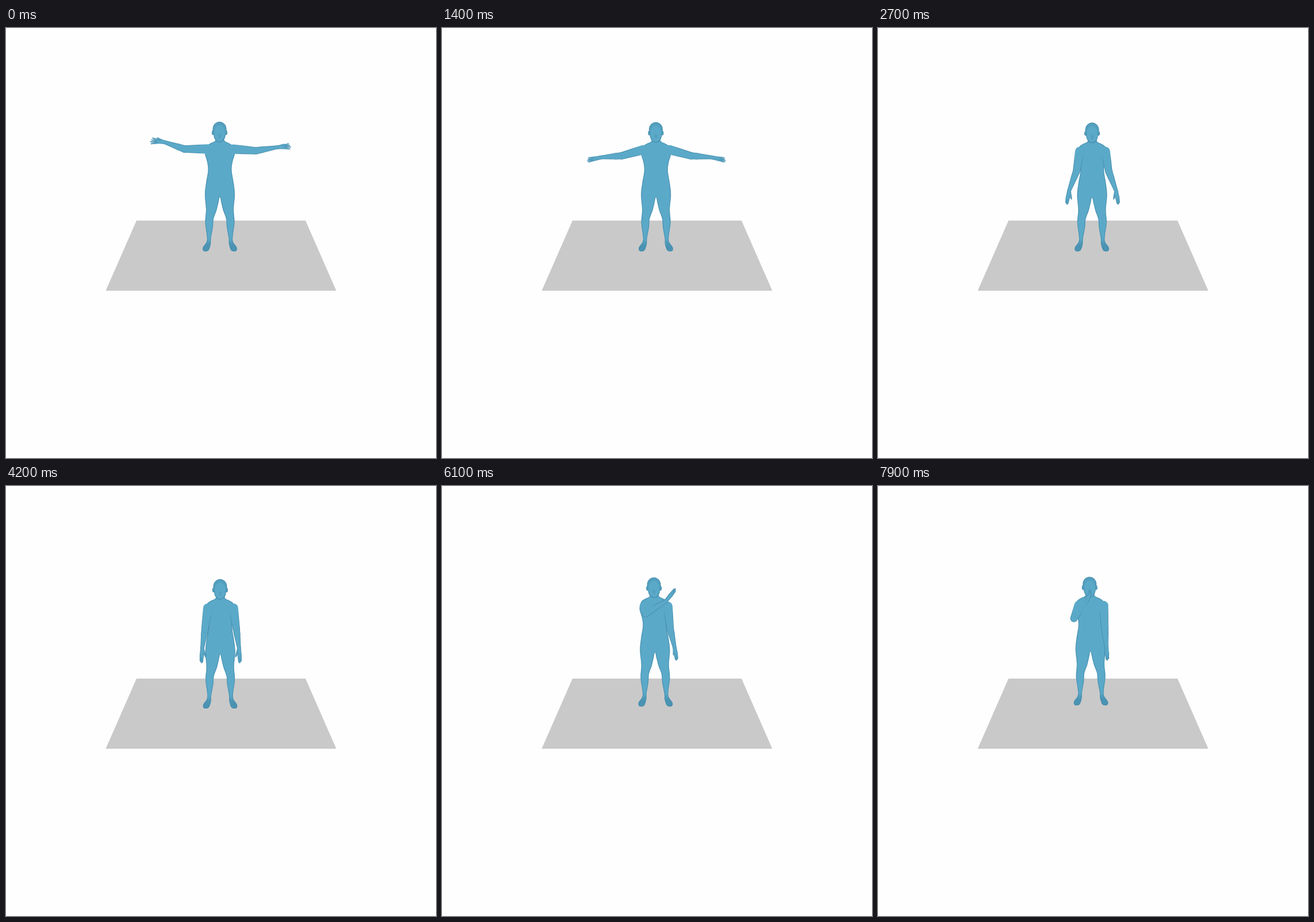
These frames come from a looping animation (748 by 748 pixels, 8 s). An HTML page with a canvas:

```html
<!DOCTYPE html>
<html lang="en">
<head>
<meta charset="utf-8">
<title>Figure on a floor</title>
<style>
html, body { margin: 0; width: 100%; height: 100%; overflow: hidden; background: #fefefe; }
canvas { display: block; width: 748px; height: 748px; }
</style>
</head>
<body>
<canvas id="stage" width="748" height="748"></canvas>
<script>
const ctx = document.getElementById('stage').getContext('2d');
const LOOP = 8000, STEP = 100;
const SKIN = '#5ba9c8', EDGE = '#4389a9';
const MID = 372, TOP = 163, HEIGHT = 226, UPPER = 39;

const mix = (a, b, u) => a + (b - a) * u;
const ease = u => u * u * (3 - 2 * u);

// Angles in degrees below the outward horizontal
const arm = (upper, fore, hand, spread, thumb, lengths = [UPPER, 36, 25]) =>
  [upper, fore, hand, spread, thumb, ...lengths];

const wave = arm(0, -19, -6, .2, .9);
const reach = arm(4, -9, -5, .17, .6);
const level = arm(2, -9, -3, .15, .6);
const lowered = arm(81, 70, 80, .05, -1, [35, 36, 24]);
const hanging = arm(82, 82, 86, .05, -1, [35, 35, 26]);
const swung = arm(84, 77, 80, .05, -.6, [38, 34, 23]);
const resting = arm(87, 85, 85, .05, -.5, [39, 33, 23]);
const crossed = arm(100, 212, 231, .05, .3, [13, 41, 27]);
const thinking = arm(69, 233, 246, .05, .3, [24, 35, 21]);

// Each move: start time, end time, state to reach
const leftArm = [wave, [0, 700, level], [900, 2800, lowered], [2800, 3600, hanging],
  [5300, 6100, crossed], [6300, 7500, thinking]];
const rightArm = [reach, [0, 700, level], [900, 2800, lowered], [2800, 3600, hanging],
  [5300, 6100, swung], [6300, 7900, resting]];
// Shift of the head (x, y) and of the feet (x, y)
const sway = [[0, 0, 0, 0], [0, 2700, [1, 1.5, 0, 0]], [2700, 4200, [1, -1, .5, -1.5]],
  [4200, 6100, [-3, -4, -.5, -5]], [6100, 7900, [-3.5, -5, -1.5, -7]]];

function stateAt(t, [first, ...moves]) {
  return moves.reduce((state, [from, to, goal]) => {
    const u = ease(Math.min(1, Math.max(0, (t - from) / (to - from))));
    return state.map((v, i) => mix(v, goal[i], u));
  }, first);
}

// Half of the body, from the neck down to the foot and up to the crotch
const HALF = [[7.5, 186], [8, 196], [17, 201], [23, 206], [26, 218], [22, 233],
  [20.5, 248], [24, 270], [26, 290], [24, 316], [25.5, 338], [22.5, 362],
  [23, 372], [29.5, 382], [28, 388], [20, 387], [16, 376], [15.5, 366],
  [12, 346], [11, 332], [6, 318], [3, 306]];

// Smooth closed curve
function curve(points) {
  const n = points.length, path = new Path2D();
  const at = i => points[(i + n) % n];
  path.moveTo(...at(0));
  for (let i = 0; i < n; i++) {
    const [a, b, c, d] = [at(i - 1), at(i), at(i + 1), at(i + 2)];
    path.bezierCurveTo(b[0] + (c[0] - a[0]) / 6, b[1] + (c[1] - a[1]) / 6,
      c[0] - (d[0] - b[0]) / 6, c[1] - (d[1] - b[1]) / 6, ...c);
  }
  path.closePath();
  return path;
}

const side = dir => HALF.map(([x, y]) => [MID + dir * x, y]);
const bodyPath = curve([...side(-1), [MID, 294], ...side(1).reverse()]);

function drawBody() {
  const feet = ctx.createLinearGradient(0, 366, 0, 378);
  feet.addColorStop(0, SKIN);
  feet.addColorStop(1, '#4a93b3');
  ctx.save();
  ctx.fillStyle = feet;
  ctx.fill(bodyPath);
  ctx.clip(bodyPath);
  ctx.globalAlpha = .6;
  ctx.strokeStyle = EDGE;
  ctx.lineWidth = 2.6;
  ctx.stroke(bodyPath);
  ctx.restore();
}

function oval(x, y, rx, ry, fill) {
  ctx.fillStyle = fill;
  ctx.beginPath();
  ctx.ellipse(x, y, rx, ry, 0, 0, 2 * Math.PI);
  ctx.fill();
}

function drawHead() {
  const x = MID - .5;
  [[EDGE, 0], ['#539fbe', .8]].forEach(([fill, inset]) => {
    oval(x - 11.5, 182, 2 - inset, 4 - inset, fill);
    oval(x + 11.5, 182, 2 - inset, 4 - inset, fill);
    oval(x, 176, 12 - inset, 13 - inset, fill);
    oval(x, 184, 10.5 - inset, 15 - inset, fill);
  });
  oval(x, 183, 9.5, 14, SKIN);
  oval(x, 188, 2, 4, 'rgba(67,137,169,.3)');
}

// Tapered segment between two [x, y, radius] joints
function segment(a, b, inset) {
  const angle = Math.atan2(b[1] - a[1], b[0] - a[0]), quarter = Math.PI / 2;
  ctx.beginPath();
  ctx.arc(a[0], a[1], Math.max(.3, a[2] - inset), angle + quarter, angle - quarter);
  ctx.arc(b[0], b[1], Math.max(.3, b[2] - inset), angle - quarter, angle + quarter);
  ctx.fill();
}

function handParts(wrist, degrees, length, spread, thumb, dir) {
  const a = degrees * Math.PI / 180;
  const point = (along, across, r) => [
    wrist[0] + dir * (Math.cos(a) * along + Math.sin(a) * across),
    wrist[1] + Math.sin(a) * along - Math.cos(a) * across, r];
  const parts = [[wrist, point(length * .45, 0, 3.5)]];
  for (let f = -1.5; f <= 1.5; f++) {
    const tip = length * (1 - .06 * Math.abs(f + .5));
    parts.push([point(length * .45, f * 1.4, 1.6),
      point(tip, f * (.7 + spread * length * .55), .9)]);
  }
  parts.push([point(length * .12, thumb * 2, 2), point(length * .55, thumb * 6.5, 1.2)]);
  return parts;
}

function drawArm(state, dir, place) {
  const [upper, fore, hand, spread, thumb, upperLen, foreLen, handLen] = state;
  const step = ([x, y], degrees, length, r) => {
    const a = degrees * Math.PI / 180;
    return [x + dir * Math.cos(a) * length, y + Math.sin(a) * length, r];
  };
  // A shortened upper arm points at the viewer and pulls the shoulder inwards
  const inward = (UPPER - upperLen) * .2;
  const drop = 3 * Math.sin(upper * Math.PI / 180);
  const shoulder = [...place(MID + .5 + dir * (23 - inward), 210.5 + drop), 8.2];
  const elbow = step(shoulder, upper, upperLen, 6.3);
  const muscle = step(elbow, fore, foreLen * .3, 5.6);
  const wrist = step(elbow, fore, foreLen, 3.3);
  const parts = [[shoulder, elbow], [elbow, muscle], [muscle, wrist],
    ...handParts(wrist, hand, handLen, spread, thumb, dir)];

  const [x, y] = shoulder;
  const edge = ctx.createRadialGradient(x, y, 9, x, y, 17);
  edge.addColorStop(0, SKIN);
  edge.addColorStop(1, EDGE);
  [[edge, 0], [SKIN, .8]].forEach(([fill, inset]) => {
    ctx.fillStyle = fill;
    parts.forEach(([a, b]) => segment(a, b, inset));
  });
}

function drawFloor() {
  ctx.fillStyle = '#c9c9c9';
  ctx.beginPath();
  ctx.moveTo(227, 335);
  ctx.lineTo(521, 335);
  ctx.lineTo(574.5, 457);
  ctx.lineTo(173.5, 457);
  ctx.fill();
}

function draw(t) {
  ctx.fillStyle = '#fefefe';
  ctx.fillRect(0, 0, 748, 748);
  drawFloor();

  const [hx, hy, fx, fy] = stateAt(t, sway);
  const lean = (fx - hx) / HEIGHT, scale = 1 + (fy - hy) / HEIGHT;
  const place = (x, y) => [x + hx + lean * (y - TOP), TOP + hy + scale * (y - TOP)];

  ctx.save();
  ctx.transform(1, 0, lean, scale, hx - TOP * lean, hy + TOP - TOP * scale);
  drawBody();
  drawHead();
  ctx.restore();

  drawArm(stateAt(t, rightArm), 1, place);
  drawArm(stateAt(t, leftArm), -1, place);
}

const start = performance.now();
function tick() {
  const t = (performance.now() - start) % LOOP;
  draw(Math.floor(t / STEP) * STEP);
  requestAnimationFrame(tick);
}
tick();
</script>
</body>
</html>
```
